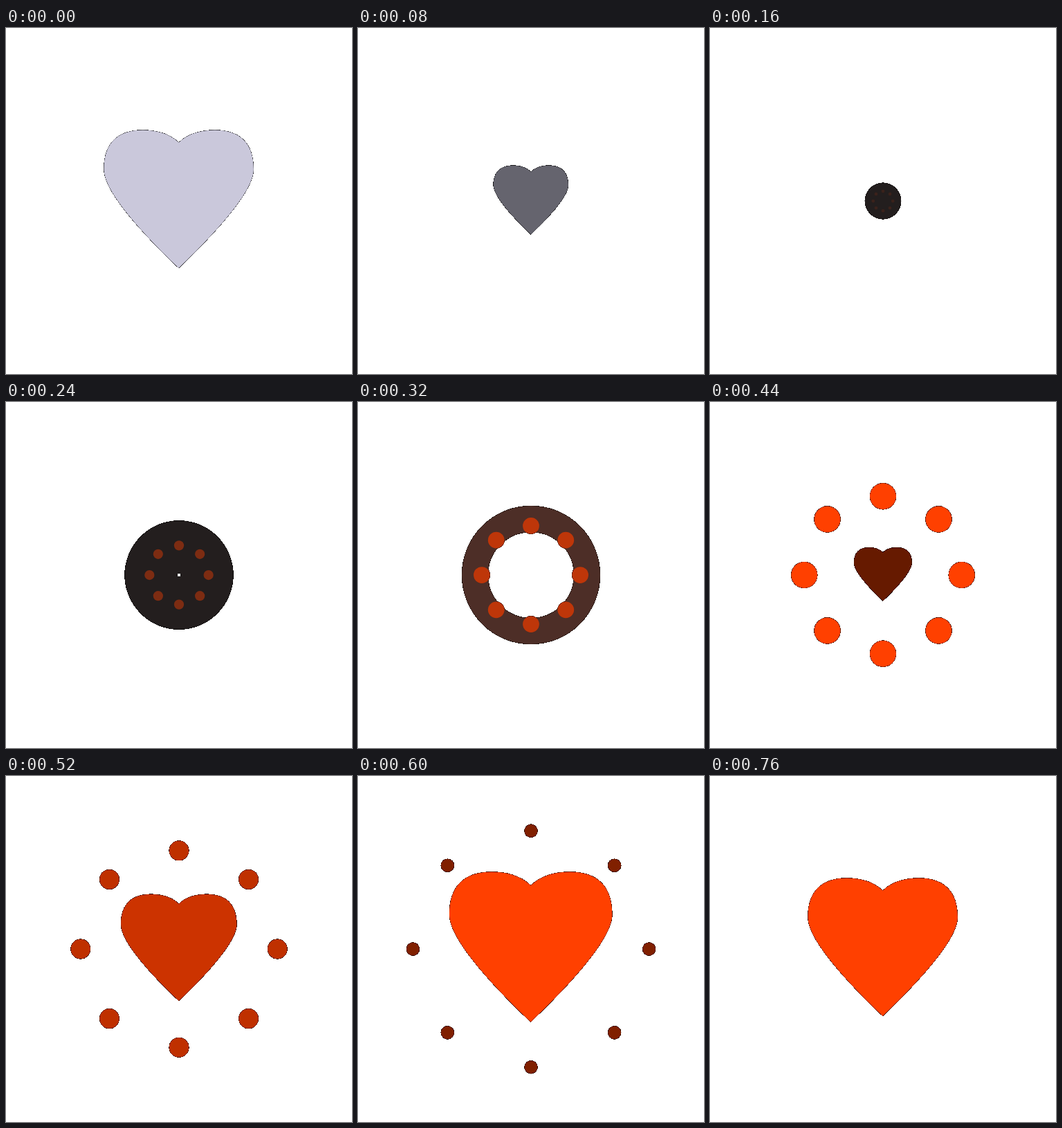
An HTML page that plays this animation: 500x500 px, repeating every 1 s.

```html
<!DOCTYPE html>
<html lang="en">
<head>
<meta charset="utf-8">
<title>Heart burst</title>
<style>
  html, body { margin: 0; width: 100%; height: 100%; overflow: hidden; background: #fff; }
  svg { display: block; width: 100%; height: 100%; }
</style>
</head>
<body>
<svg viewBox="0 0 500 500">
  <!-- Hard outer edge: soft edge pixels become opaque and darken towards black -->
  <filter id="edge" filterUnits="userSpaceOnUse" x="0" y="0" width="500" height="500" color-interpolation-filters="sRGB">
    <feComponentTransfer in="SourceAlpha" result="mask">
      <feFuncA type="linear" slope="16" intercept="-1"/>
    </feComponentTransfer>
    <feMerge result="dark">
      <feMergeNode in="mask"/>
      <feMergeNode in="SourceGraphic"/>
    </feMerge>
    <feComposite in="dark" in2="mask" operator="in"/>
  </filter>
  <g filter="url(#edge)">
    <g id="stage" transform="translate(250 250)">
      <circle id="ring" fill="none"/>
      <path id="heart" d="M0-84.5C-14-98-33-102.5-52-102.5C-88-102.5-108.2-84-108.2-46C-108.2-18-67 33 0 97C67 33 108.2-18 108.2-46C108.2-84 88-102.5 52-102.5C33-102.5 14-98 0-84.5Z"/>
    </g>
  </g>
</svg>
<script>
  const STEP = 40, LOOP = 1000, LAST = 19;
  const LILAC = [202, 200, 219], ORANGE = [255, 64, 0];
  const INK = [35, 30, 30], BROWN = [118, 61, 48], BLACK = [0, 0, 0];

  const byId = id => document.getElementById(id);
  const stage = byId('stage'), ring = byId('ring'), heart = byId('heart');
  const dots = Array.from({ length: 8 }, () =>
    stage.appendChild(document.createElementNS('http://www.w3.org/2000/svg', 'circle')));

  const lerp = (a, b, k) => a + (b - a) * k;
  const span = (n, a, b) => Math.min(1, Math.max(0, (n - a) / (b - a)));
  const mix = (a, b, k) => `rgb(${a.map((v, i) => Math.round(lerp(v, b[i], k)))})`;
  const show = (el, on) => { el.style.display = on ? '' : 'none'; };

  function setAttrs(el, attrs) {
    for (const name in attrs) el.setAttribute(name, attrs[name]);
  }

  // Linear interpolation through [step, value] keys
  function track(n, keys) {
    let value = keys[0][1];
    for (let i = 1; i < keys.length; i++) {
      const [a, from] = keys[i - 1], [b, to] = keys[i];
      if (n >= a) value = lerp(from, to, span(n, a, b));
    }
    return value;
  }

  function drawHeart(n) {
    const shrinking = n < 5;
    const scale = shrinking
      ? 1 - span(n, 0, 4)
      : track(n, [[9, 0], [14, 0.967], [15, 1.088], [19, 1]]);
    const fill = shrinking ? mix(BLACK, LILAC, scale) : mix(BLACK, ORANGE, span(n, 9, 14));
    show(heart, scale > 0);
    setAttrs(heart, { transform: `scale(${scale}) translate(-0.3 0)`, fill });
  }

  function drawRing(n) {
    const outer = track(n, [[3, 0], [6, 78.4], [10, 121.4]]);
    const inner = track(n, [[6, 0], [6, 2.7], [10, 121.4]]);
    show(ring, outer > inner);
    setAttrs(ring, {
      r: (outer + inner) / 2,
      'stroke-width': outer - inner,
      stroke: mix(INK, BROWN, span(n, 6, 10))
    });
  }

  function drawDots(n) {
    const distance = 14.22 * Math.max(0, n - 3);
    const r = track(n, [[3, 0], [11, 19], [19, 0]]);
    const fill = n < 11 ? mix(INK, ORANGE, span(n, 3.25, 10)) : mix(ORANGE, BLACK, span(n, 11, 19));
    dots.forEach((dot, i) => {
      const angle = i * Math.PI / 4;
      show(dot, r > 0);
      setAttrs(dot, { cx: distance * Math.cos(angle), cy: distance * Math.sin(angle), r, fill });
    });
  }

  function draw(ms) {
    const n = Math.min(LAST, Math.floor((ms % LOOP) / STEP));
    drawHeart(n);
    drawRing(n);
    drawDots(n);
  }

  const start = performance.now();
  function tick() {
    draw(performance.now() - start);
    requestAnimationFrame(tick);
  }
  tick();
</script>
</body>
</html>
```
